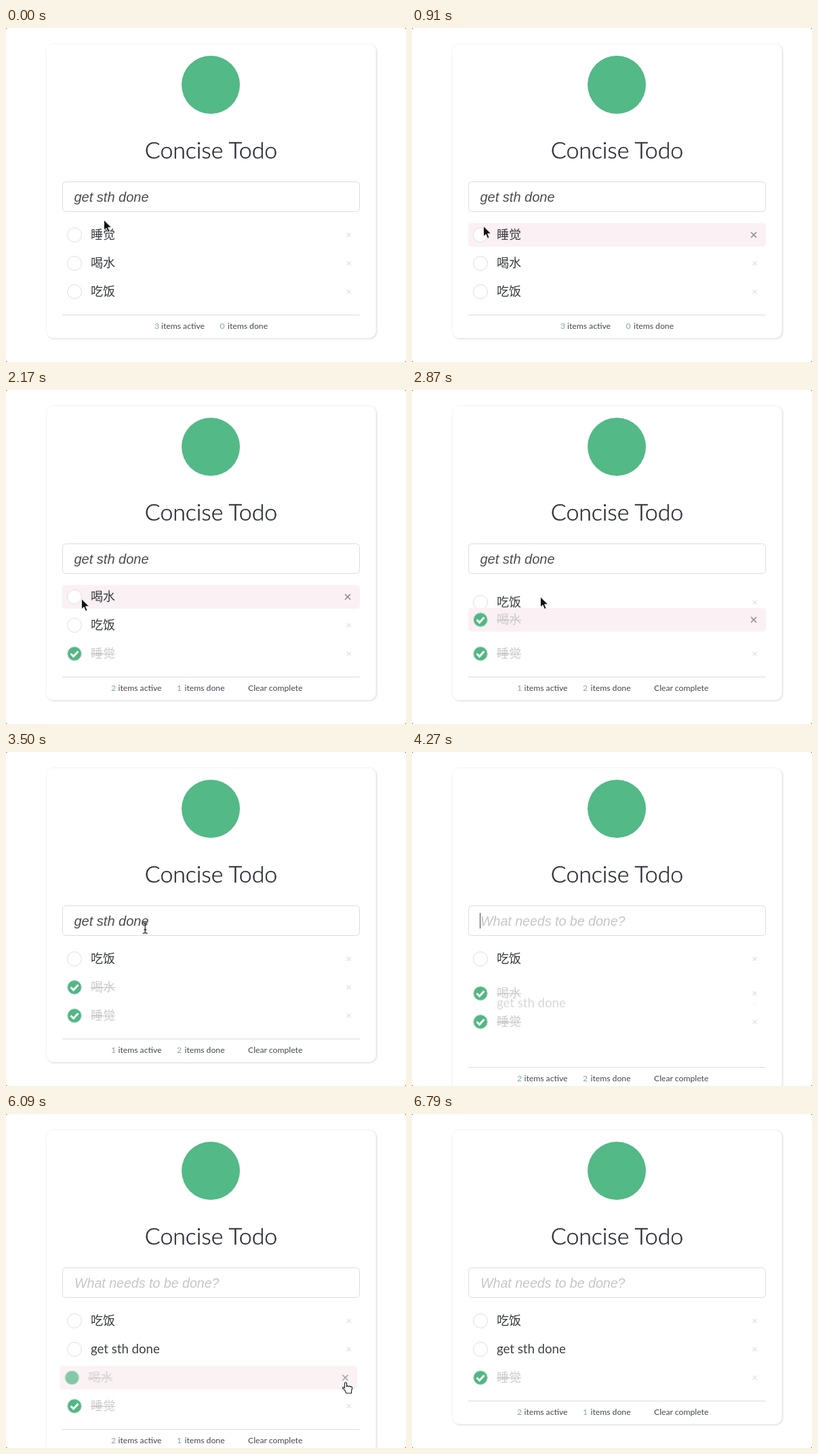
Write an HTML page that moves like this. It is 590x494 px and loops after 6.86 s.

```html
<!DOCTYPE html>
<html lang="en">
<head>
<meta charset="utf-8">
<title>Concise Todo</title>
<style>
  html, body { margin: 0; width: 100%; height: 100%; overflow: hidden; background: #fff; }
  svg { display: block; width: 590px; height: 494px; }
  text { font-family: Lato, "Noto Sans CJK SC", "Noto Sans CJK", sans-serif; white-space: pre; }
  .card { fill: #fff; stroke: #f5f5f5; filter: drop-shadow(1.5px 1.5px 1px rgba(0, 0, 0, .14)); }
  .title { font-size: 33.8px; font-weight: 300; fill: #2b2d36; stroke: #2b2d36; stroke-width: .45; text-anchor: middle; }
  .box { fill: #fff; stroke: #dcdcdc; }
  .field { font: italic 20px "Liberation Sans", Arial, sans-serif; fill: #4c4c4c; }
  .hint { font-size: 19.6px; fill: #c6c6c6; }
  .rule { stroke: #dcdcdc; }
  .tint { fill: #fbf0f3; }
  .ring { fill: #fff; stroke: #dedede; }
  .disc { fill: #53b685; stroke: #b5dfca; }
  .tick { fill: none; stroke: #fff; stroke-width: 3; }
  .cross { stroke: #cdcdcd; fill: none; }
  .cross.strong { stroke: #858585; stroke-width: 1.4; }
  .label { font-size: 18px; fill: #35383d; }
  .label.latin { font-size: 18.6px; fill: #3d4045; }
  .done .label { fill: #cbcbcb; }
  .strike { stroke: #c4c4c4; stroke-width: 1.2; }
  .foot text { font-size: 12.2px; fill: #44474d; }
  .foot .num { fill: #7fa99b; }
</style>
</head>
<body>
<svg viewBox="0 0 590 494">
  <rect width="590" height="494" fill="#777"/>
  <rect width="590" height="494" rx="3" fill="#fff"/>
  <rect id="card" class="card" x="59.5" y="23.5" width="486" height="435" rx="10"/>
  <circle cx="302" cy="84" r="43" fill="#53b987"/>
  <text class="title" x="302.500" y="193">Concise Todo</text>
  <rect class="box" x="83.5" y="227.5" width="438" height="44" rx="5"/>
  <text id="typed" class="field" x="100.5" y="257">get sth done</text>
  <text id="hint" class="field hint" x="101" y="257">What needs to be done?</text>
  <path id="caret" d="M100.5 238v23" stroke="#444"/>
  <g id="rows"></g>
  <g id="foot" class="foot">
    <path class="rule" d="M83 424.5h438.500"/>
    <g id="footStart">
      <text class="num" x="219" y="445">3</text><text x="229" y="445">items active</text>
      <text class="num" x="315.500" y="445">0</text><text x="327" y="445">items done</text>
    </g>
    <g id="footLater">
      <text id="active1" class="num" x="155" y="445">1</text>
      <text id="active2" class="num" x="155" y="445">2</text>
      <text x="165.500" y="445">items active</text>
      <text id="done1" class="num" x="252" y="445">1</text>
      <text id="done2" class="num" x="252" y="445">2</text>
      <text x="263.500" y="445">items done</text>
      <text x="357" y="445">Clear complete</text>
    </g>
  </g>
  <g id="pointer">
    <path id="arrow" d="M-.5 0v15l3.500-3 2.500 6 2.500-1-2.500-6h5z" fill="#111" stroke="#fff" stroke-width=".8"/>
    <path id="beam" d="M-3.500-8q3 0 3.500 2q.5-2 3.500-2M0-6V6M-3.500 8q3 0 3.500-2q.5 2 3.500 2M-2 2.500h4" fill="none" stroke="#222" stroke-width="1.3"/>
    <path id="hand" d="M-.5 1q1.500-2 3 0v5l1-1 2 1 1-.5 1.500 1 1-.5q2 .5 1.500 3l-1 4v3H2l-2-4-3.500-4q.5-2 3 0z" fill="#fff" stroke="#222" stroke-width="1.2"/>
  </g>
</svg>
<script>
const LOOP = 6860;
const CHECK_FIRST = 1599, CHECK_SECOND = 2620, ADD = 4189, REMOVE = 6025, COLLAPSE = 6525;
const $ = id => document.getElementById(id);

// Each step is [ms, value, easing to the next step]; without easing the value holds.
function track(el, prop, steps) {
  const frames = steps.map(([ms, value, easing = 'steps(1, end)']) =>
    ({ offset: ms / LOOP, [prop]: value, easing }));
  frames.push({ offset: 1, [prop]: steps[steps.length - 1][1] });
  el.animate(frames, { duration: LOOP, iterations: Infinity }).startTime = 0;
}

// Shows an element only during the given [from, to] spans.
function show(el, ...spans) {
  const steps = spans[0] && spans[0][0] === 0 ? [] : [[0, 0]];
  for (const [from, to] of spans) {
    steps.push([from, 1]);
    if (to < LOOP) steps.push([to, 0]);
  }
  track(el, 'opacity', steps);
}

const at = (x, y) => `translate(${x}px, ${y}px)`;
const slide = (el, steps) =>
  track(el, 'transform', steps.map(([ms, y, easing]) => [ms, at(0, y), easing]));

function addRow(id, label, latin) {
  const text = `<text class="label${latin ? ' latin' : ''}" x="125" y="${latin ? 5.5 : 6}">${label}</text>`;
  $('rows').insertAdjacentHTML('beforeend', `
    <g id="${id}"><g class="body">
      <rect class="tint" x="83" y="-17.5" width="439" height="35" rx="5"/>
      <g class="open"><circle class="ring" cx="101" cy="0" r="10.5"/>${text}</g>
      <g class="done">
        <circle class="disc" cx="101" cy="0" r="10.3"/>
        <path class="tick" d="M95.500 0l4 4 7-7.500"/>
        ${text}<path class="strike" d="M125 .5h36"/>
      </g>
      <path class="cross thin" d="M502.500-3l6 6m0-6l-6 6"/>
      <path class="cross strong" d="M500-4l8 8m0-8l-8 8"/>
    </g></g>`);
  return $(id);
}

function setRow(row, { y, hover = [], checked = LOOP }) {
  const part = name => row.querySelector('.' + name);
  slide(row, y);
  show(part('open'), [0, checked]);
  show(part('done'), ...(checked < LOOP ? [[checked, LOOP]] : []));
  show(part('tint'), ...hover);
  show(part('strong'), ...hover);
  const edges = [0, ...hover.flat(), LOOP], idle = [];
  for (let i = 0; i < edges.length; i += 2) if (edges[i] < edges[i + 1]) idle.push([edges[i], edges[i + 1]]);
  show(part('thin'), ...idle);
}

const eat = addRow('eat', '吃饭');
const get = addRow('get', 'get sth done', true);
const water = addRow('water', '喝水');
const sleep = addRow('sleep', '睡觉');

setRow(eat, {
  y: [[0, 390], [CHECK_FIRST, 390, 'ease'], [CHECK_FIRST + 500, 348],
      [CHECK_SECOND, 348, 'ease'], [CHECK_SECOND + 500, 306]],
  hover: [[3200, 3360], [5020, 5160]]
});
setRow(get, {
  y: [[0, 378], [ADD, 378, 'ease'], [ADD + 500, 348]],
  hover: [[5230, 5650]]
});
setRow(water, {
  y: [[0, 348], [CHECK_FIRST, 348, 'ease'], [CHECK_FIRST + 500, 306],
      [CHECK_SECOND, 306, 'ease'], [CHECK_SECOND + 500, 348],
      [ADD, 348, 'ease'], [ADD + 500, 390]],
  hover: [[2030, 3150], [5720, LOOP]],
  checked: CHECK_SECOND
});
setRow(sleep, {
  y: [[0, 306], [CHECK_FIRST, 306, 'ease'], [CHECK_FIRST + 500, 390],
      [ADD, 390, 'ease'], [ADD + 500, 432], [COLLAPSE, 390]],
  hover: [[800, CHECK_FIRST]],
  checked: CHECK_FIRST
});

track(get, 'opacity', [[0, 0], [ADD, 0, 'ease'], [ADD + 500, 1]]);

// The removed row swings left, then slides right while fading.
const leaving = water.querySelector('.body');
track(leaving, 'transform', [
  [0, at(0, 0)], [REMOVE, at(0, 0), 'ease-in'], [6090, at(-3.5, 0), 'ease-out'],
  [6150, at(-9, 0), 'ease-in-out'], [6240, at(12, 0), 'ease-out'], [COLLAPSE, at(26, 0)]
]);
track(leaving, 'opacity', [[0, 1], [REMOVE, 1, 'linear'], [6090, .85, 'linear'], [6400, 0]]);
track(water.querySelector('.disc'), 'opacity', [[0, 1], [REMOVE, 1, 'linear'], [6090, .84]]);
show(water.querySelector('.tick'), [0, REMOVE]);

track($('card'), 'height', [[0, '435px'], [ADD, '477px'], [COLLAPSE, '435px']]);
slide($('foot'), [[0, 0], [ADD, 42], [COLLAPSE, 0]]);
show($('footStart'), [0, CHECK_FIRST]);
show($('footLater'), [CHECK_FIRST, LOOP]);
show($('active1'), [CHECK_SECOND, ADD]);
show($('active2'), [CHECK_FIRST, CHECK_SECOND], [ADD, LOOP]);
show($('done1'), [CHECK_FIRST, CHECK_SECOND], [REMOVE, LOOP]);
show($('done2'), [CHECK_SECOND, REMOVE]);
show($('typed'), [0, ADD]);
show($('hint'), [ADD, LOOP]);
show($('caret'), [ADD, 4700]);

track($('pointer'), 'transform', [
  [0, 145, 284], [70, 145, 284, 1], [490, 112, 282], [630, 112, 282, 1], [1190, 100, 304],
  [1610, 100, 304, 1], [1680, 115, 305, 1], [1960, 112, 309], [2380, 112, 309, 1],
  [2560, 100, 306], [2690, 100, 306, 1], [2870, 190, 306, 1], [3080, 208, 308],
  [3150, 208, 308, 1], [3600, 205, 255], [4480, 240, 255, 1], [4700, 273, 255],
  [4900, 273, 255, 1], [5460, 470, 347], [5600, 470, 347, 1], [5880, 500, 397],
  [6300, 500, 397, 1], [6700, 515, 500]
].map(([ms, x, y, moves]) => [ms, at(x, y), moves ? 'ease-in-out' : undefined]));
show($('arrow'), [0, 3450], [5000, 5800], [6420, 6700]);
show($('beam'), [3450, 4060], [4480, 5000]);
show($('hand'), [5800, 6420]);
</script>
</body>
</html>
```
